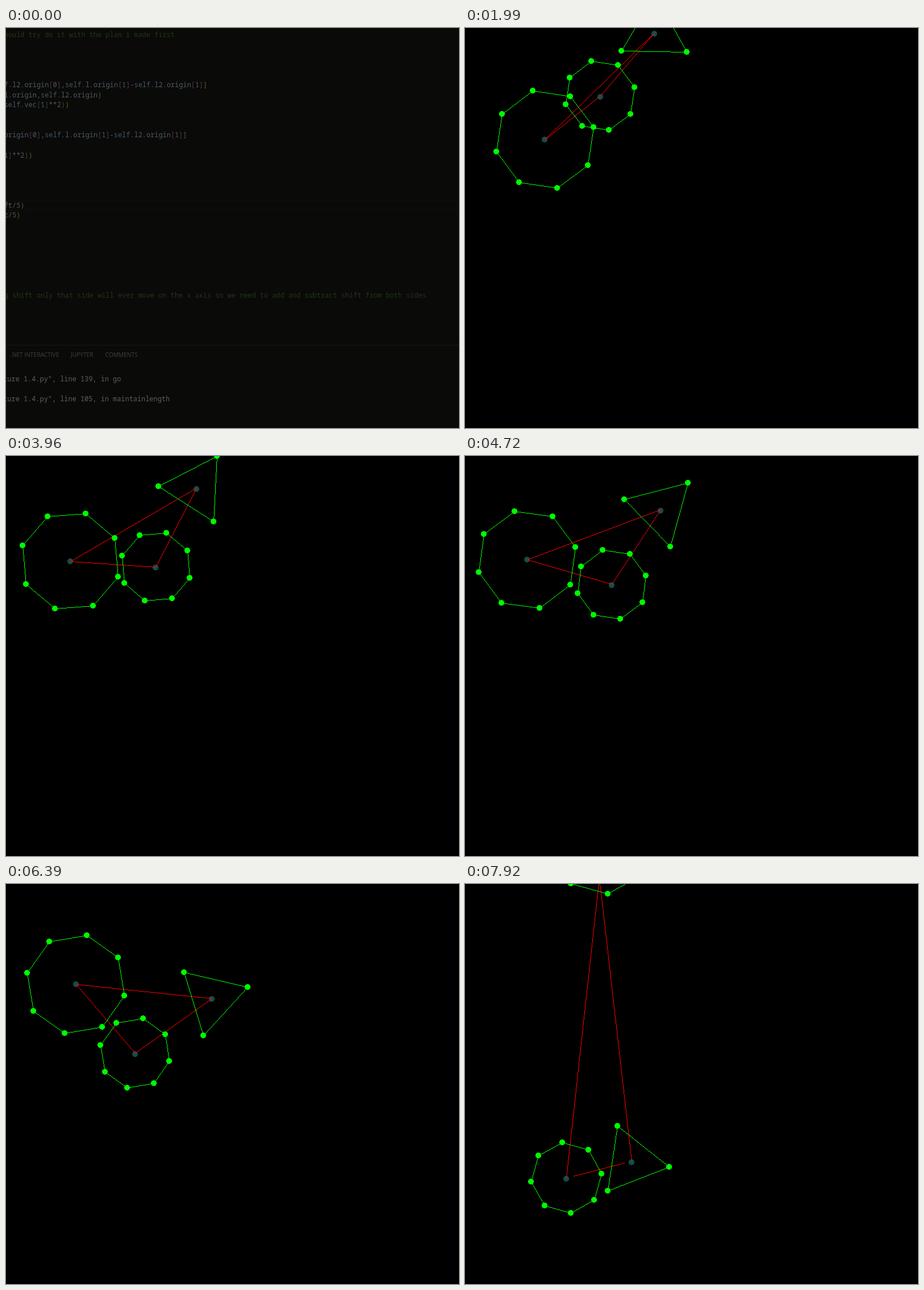
Recreate the animation shown at these times as an HTML page with a canvas. Size 797 by 703 pixels, loop 7990 ms.

```html
<!DOCTYPE html>
<html lang="en">
<head>
<meta charset="utf-8">
<title>Linked polygons</title>
<style>
html, body { margin: 0; width: 100%; height: 100%; overflow: hidden; background: #000; }
canvas { display: block; }
</style>
</head>
<body>
<canvas id="stage" width="797" height="703"></canvas>
<script>
const ctx = document.getElementById('stage').getContext('2d');
const WIDTH = 797, HEIGHT = 703;
const LOOP = 7990, EDITOR_TIME = 70, TICK = 69.6, LAST_TICK = 114;
const GREEN = '#00ff00', RED = '#ff0000', TEAL = '#0f4d4d';

// Key poses of the slow swing. The three x positions always add up to X_SUM.
const X_SUM = 711;
const POSES = [
  { tick: 16, bigX: 157.8, bigY: 202.9, smallX: 219.2, smallY: 86, triY: -2.6 },
  { tick: 41, bigX: 125.5, bigY: 189.5, smallX: 252.8, smallY: 149.8, triY: 20.6 },
  { tick: 57, bigX: 113, bigY: 184.5, smallX: 263.3, smallY: 194.5, triY: 56 },
  { tick: 78, bigX: 109, bigY: 179.5, smallX: 248.4, smallY: 253.8, triY: 134 },
  { tick: 92, bigX: 122.6, bigY: 176, smallX: 226.8, smallY: 297, triY: 200.5 }
];
// Where the links fling the shapes at the end
const FLUNG = { bigX: 240.3, bigY: -70.4, smallX: 178.2, smallY: 516, triY: 487 };

const BIG = { sides: 8, radius: 88, hubDrop: 0 };
const SMALL = { sides: 8, radius: 62.3, hubDrop: 1.7 };
const TRIANGLE = { sides: 3, radius: 66.8, hubDrop: 1.8 };

const lerp = (a, b, k) => a + (b - a) * k;
const mix = (p, q, k) => [lerp(p[0], q[0], k), lerp(p[1], q[1], k)];

function smoothstep(from, to, value) {
  const u = Math.min(Math.max((value - from) / (to - from), 0), 1);
  return u * u * (3 - 2 * u);
}

function slope(i, key) {
  const a = POSES[Math.max(i - 1, 0)], b = POSES[Math.min(i + 1, POSES.length - 1)];
  return (b[key] - a[key]) / (b.tick - a.tick);
}

// Smooth curve through the poses, straight beyond both ends
function swing(tick, key) {
  const last = POSES.length - 1;
  if (tick <= POSES[0].tick) return POSES[0][key] + (tick - POSES[0].tick) * slope(0, key);
  if (tick >= POSES[last].tick) return POSES[last][key] + (tick - POSES[last].tick) * slope(last, key);
  const i = POSES.findIndex(p => p.tick > tick) - 1;
  const a = POSES[i], b = POSES[i + 1], span = b.tick - a.tick;
  const u = (tick - a.tick) / span, v = 1 - u;
  return lerp(a[key], b[key], u * u * (3 - 2 * u))
    + span * u * v * (v * slope(i, key) - u * slope(i + 1, key));
}

// Hard-edged one pixel line
function line([x0, y0], [x1, y1], color) {
  x0 = Math.round(x0); y0 = Math.round(y0);
  const dx = Math.round(x1) - x0, dy = Math.round(y1) - y0;
  const steps = Math.max(Math.abs(dx), Math.abs(dy), 1);
  ctx.fillStyle = color;
  for (let i = 0; i <= steps; i++) {
    ctx.fillRect(Math.round(x0 + dx * i / steps), Math.round(y0 + dy * i / steps), 1, 1);
  }
}

// Hard-edged disc, ten pixels wide
function dot([x, y], color) {
  x = Math.round(x); y = Math.round(y);
  ctx.fillStyle = color;
  for (let dy = -5; dy < 5; dy++) {
    const half = Math.round(Math.sqrt(25 - (dy + 0.5) ** 2));
    ctx.fillRect(x - half, y + dy, half * 2, 1);
  }
}

function drawLinks(big, small, tri, strain) {
  const bigEnd = [big[0] - 4.6 * strain, big[1] + 59.4 * strain];
  line(bigEnd, small, RED);
  line(bigEnd, tri, RED);
  line(mix(small, tri, 0.11 * strain), mix(tri, small, 0.11 * strain), RED);
}

function drawShape({ sides, radius }, [x, y], angle) {
  const points = Array.from({ length: sides }, (_, i) => {
    const a = angle + i * 2 * Math.PI / sides;
    return [x + radius * Math.cos(a), y + radius * Math.sin(a)];
  });
  points.forEach((p, i) => line(p, points[(i + 1) % sides], GREEN));
  points.forEach(p => dot(p, GREEN));
}

function drawPolygons(tick) {
  ctx.fillStyle = '#000';
  ctx.fillRect(0, 0, WIDTH, HEIGHT);
  const fling = smoothstep(95, 111, tick);
  const at = key => lerp(swing(tick, key), FLUNG[key], fling);
  const big = [at('bigX'), at('bigY')];
  const small = [at('smallX'), at('smallY')];
  const tri = [X_SUM - big[0] - small[0], at('triY')];
  const placed = [[BIG, big], [SMALL, small], [TRIANGLE, tri]];
  const angle = 0.02 * tick - 0.042;
  placed.forEach(([shape, [x, y]]) => dot([x, y + shape.hubDrop], TEAL));
  drawLinks(big, small, tri, fling);
  placed.forEach(([shape, center]) => drawShape(shape, center, angle));
}

const PITCH = 7.15, LEFT = -3.3, ROW = 17.63;
const COMMENT = '#21361a', PLAIN = '#555553', OUTPUT = '#5f5f5d';
const BRACKETS = ['#66581a', '#573455', '#184a66'];
// Text by editor row; rows without an entry are empty
const CODE = {
  5: 'f.l2.origin[0],self.l.origin[1]-self.l2.origin[1]]',
  6: 'l.origin,self.l2.origin)',
  7: 'self.vec[1]**2))',
  10: 'origin[0],self.l.origin[1]-self.l2.origin[1]]',
  12: '1]**2))',
  17: 'ft/5)',
  18: 't/5)'
};
const COMMENTS = {
  0: 'hould try do it with the plan i made first',
  26: 'g shift only that side will ever move on the x axis so we need to add and subtract shift from both sides'
};
const TERMINAL = ['ture 1.4.py", line 139, in go', 'ture 1.4.py", line 105, in maintainlength'];

const rowY = row => Math.round(16 + ROW * row);

function put(text, x, y, color) {
  ctx.fillStyle = color;
  ctx.fillText(text, x, y);
}

// Bracket colours depend on depth, counted back from the end of the line.
function drawCode(text, y) {
  let depth = 0;
  for (const { 0: word, index } of [...text.matchAll(/\w+|\W/g)].reverse()) {
    let color = PLAIN;
    if (')]'.includes(word)) color = BRACKETS[depth++];
    else if ('(['.includes(word)) color = BRACKETS[--depth];
    else if (word === 'self') color = '#40586a';
    else if (/^[a-z]/.test(word)) color = '#4d5b63';
    put(word, LEFT + PITCH * index, y, color);
  }
}

function rule(y, color) {
  ctx.fillStyle = color;
  ctx.fillRect(0, y, WIDTH, 1);
}

function drawEditor() {
  ctx.fillStyle = '#0a0a08';
  ctx.fillRect(0, 0, WIDTH, HEIGHT);
  rule(303, '#10100e');
  rule(319, '#10100e');
  rule(557, '#191917');
  rule(590, '#0e0e0c');
  ctx.font = '11.92px "Noto Sans Mono", monospace';
  for (const row in CODE) drawCode(CODE[row], rowY(row));
  for (const row in COMMENTS) put(COMMENTS[row], LEFT, rowY(row), COMMENT);
  TERMINAL.forEach((text, i) => put(text, LEFT - 1.5, 621 + 35 * i, OUTPUT));
  ctx.font = '10.2px "Open Sans", sans-serif';
  put('.NET INTERACTIVE', 8, 578, '#40403e');
  put('JUPYTER', 114, 578, '#40403e');
  put('COMMENTS', 174.5, 578, '#40403e');
}

const begin = performance.now();

function frame() {
  const ms = Math.max(performance.now() - begin, 0) % LOOP;
  if (ms < EDITOR_TIME) drawEditor();
  else drawPolygons(Math.min(Math.floor(ms / TICK + 0.45), LAST_TICK));
  requestAnimationFrame(frame);
}
frame();
</script>
</body>
</html>
```
